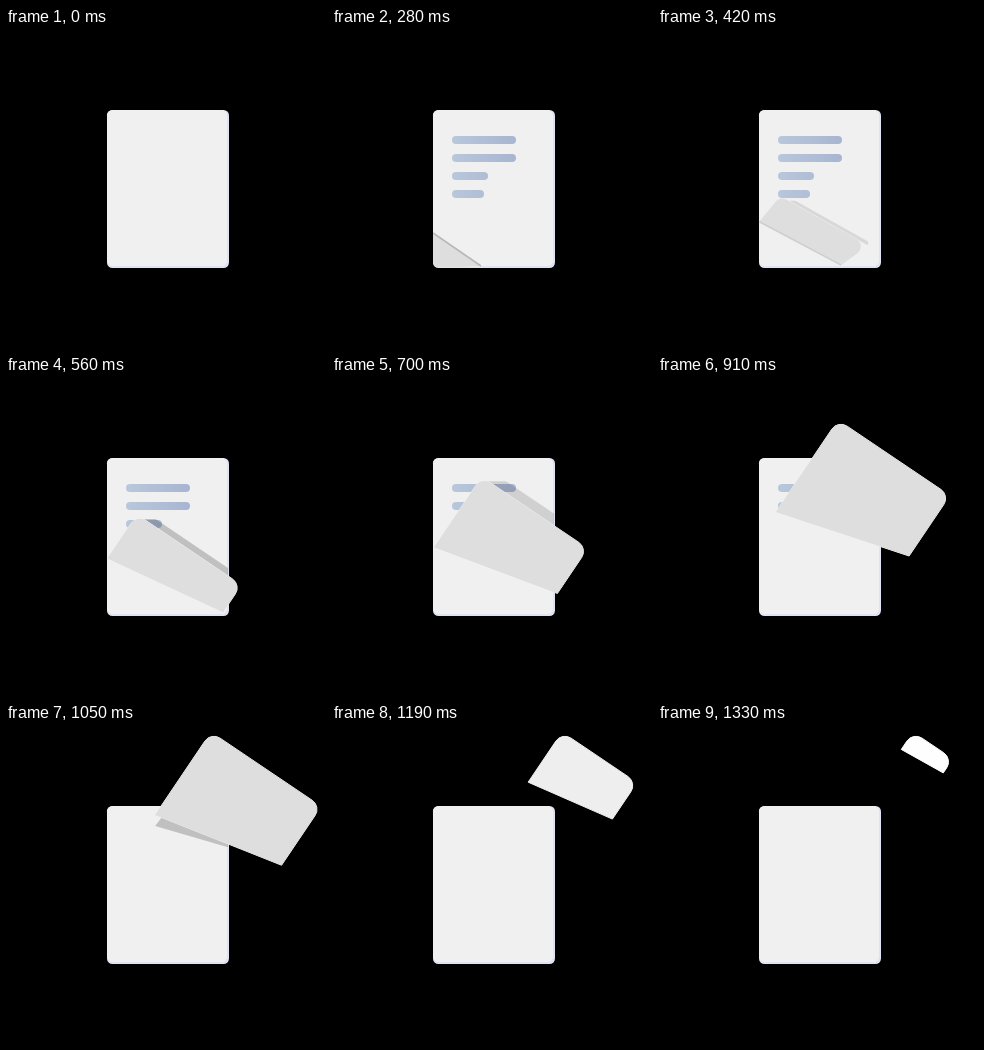
Write an HTML page with a canvas that moves like this. It is 320x320 px and loops after 1.43 s.

```html
<!DOCTYPE html>
<html>
<head>
<meta charset="utf-8">
<style>
html, body { margin: 0; width: 100%; height: 100%; overflow: hidden; background: #000; }
canvas { display: block; }
</style>
</head>
<body>
<canvas id="stage" width="320" height="320"></canvas>
<script>
const ctx = document.getElementById('stage').getContext('2d');
const STEP = 70, LOOP = 1430, LAST = 19;
const PEEL = 4, LIFT = 8, AWAY = 15;
const TILT = 34 * Math.PI / 180;

// The lifted card: top-left corner, length of its top edge and of both sides down to the fold
const CARD = [
  { step: LIFT, x: 131, y: 138.5, top: 126, left: 53, right: 33 },
  { step: 11, x: 159, y: 82, top: 129, left: 101, right: 65 },
  { step: 13, x: 180, y: 44, top: 135, left: 111, right: 73 },
  { step: AWAY, x: 205, y: 8, top: 133, left: 100, right: 71 },
  { step: LAST, x: 255, y: 8, top: 48, left: 21, right: 17 }
];

const clamp = (v, lo = 0, hi = 1) => Math.min(hi, Math.max(lo, v));
const mix = (a, b, t) => a + (b - a) * t;
const mixPoint = (p, q, t) => ({ x: mix(p.x, q.x, t), y: mix(p.y, q.y, t) });
const along = (p, angle, d) => ({ x: p.x + d * Math.cos(angle), y: p.y + d * Math.sin(angle) });

// Corners in order: left fold end, top left, top right, right fold end
function cardAt(step) {
  const i = Math.max(1, CARD.findIndex(k => k.step >= step));
  const from = CARD[i - 1], to = CARD[i];
  const t = (step - from.step) / (to.step - from.step);
  const at = key => mix(from[key], to[key], t);
  const topLeft = { x: at('x'), y: at('y') };
  const topRight = along(topLeft, TILT, at('top'));
  const down = TILT + Math.PI / 2;
  return [along(topLeft, down, at('left')), topLeft, topRight, along(topRight, down, at('right'))];
}

// The page corner swings up while the fold advances evenly
function peelAt(step) {
  const t = (step - PEEL) / (LIFT - PEEL), swing = Math.sin(t * Math.PI / 2);
  const [a, d, c, b] = cardAt(LIFT);
  const foldEnd = { x: 149, y: 238 };
  return [
    mixPoint({ x: 101, y: 205 }, a, t),
    mixPoint({ x: 101, y: 240 }, d, swing),
    mixPoint(foldEnd, c, swing),
    mixPoint(foldEnd, b, t)
  ];
}

function roundRect(x, y, w, h, r, fill) {
  ctx.beginPath();
  ctx.roundRect(x, y, w, h, r);
  ctx.fillStyle = fill;
  ctx.fill();
}

function shade(points, alpha) {
  ctx.beginPath();
  points.forEach(([x, y]) => ctx.lineTo(x, y));
  ctx.fillStyle = `rgba(0,0,0,${alpha})`;
  ctx.fill();
}

function clipTo(buildPath, draw) {
  ctx.save();
  ctx.beginPath();
  buildPath();
  ctx.clip();
  draw();
  ctx.restore();
}

const sheetPath = () => ctx.roundRect(101, 82, 121, 157, 5.5);

function drawLines(step) {
  const tint = ctx.createLinearGradient(120, 0, 184, 0);
  tint.addColorStop(0, '#b9c7db');
  tint.addColorStop(1, '#a8b5d1');
  [64, 64, 36, 32].slice(0, step).forEach((w, i) => roundRect(120, 108 + 18 * i, w, 8, 4, tint));
}

function drawShadows(step, [a, d, c, b]) {
  // band cast above the lifted edge
  const lift = 8 + (step - LIFT) * 2;
  const above = step < LIFT ? 0.05 * (step - PEEL) : 0.2 - 0.033 * (step - LIFT);
  if (above > 0) {
    clipTo(() => ctx.rect(0, d.y + 4.5, 320, 320), () => shade([
      [d.x, d.y], [d.x, d.y - lift], [c.x, c.y - lift], [c.x, c.y]
    ], above));
  }
  // wedge cast below the sheet as it leaves
  const below = 0.2 - 0.1 * Math.abs(step - AWAY);
  if (below > 0) {
    shade([[a.x + 7, a.y + 2], [a.x, a.y + 11], [a.x + 72, a.y + 32], [b.x, b.y]], below);
  }
}

function drawFlap(step, [a, d, c, b]) {
  const r = clamp(6 + (step - PEEL) * 1.25, 6, 11);
  const grey = mix(222, 254, clamp((step - AWAY) / (LAST - AWAY)));
  ctx.beginPath();
  ctx.moveTo(a.x, a.y);
  ctx.arcTo(d.x, d.y, c.x, c.y, r);
  ctx.arcTo(c.x, c.y, b.x, b.y, r);
  ctx.lineTo(b.x, b.y);
  ctx.closePath();
  ctx.lineWidth = 1;
  ctx.strokeStyle = '#f0f0f0';
  ctx.stroke();
  ctx.fillStyle = `rgb(${grey},${grey},${grey})`;
  ctx.fill();

  const crease = clamp((LIFT - step) / (LIFT - PEEL));
  if (crease > 0) {
    ctx.beginPath();
    ctx.moveTo(a.x, a.y);
    ctx.lineTo(b.x, b.y);
    ctx.lineWidth = 1.6;
    ctx.strokeStyle = `rgba(184,184,184,${crease})`;
    ctx.stroke();
  }
}

function draw(step) {
  ctx.clearRect(0, 0, 320, 320);
  roundRect(101, 82, 122, 158, 5.5, '#dfe3f3');
  roundRect(101, 82, 120, 156, 5.5, '#f0f0f0');
  if (step < PEEL - 1) return drawLines(step);

  const pose = step < LIFT ? peelAt(step) : cardAt(step);
  const [a, , , b] = pose;
  const foldY = x => a.y + (b.y - a.y) / (b.x - a.x) * (x - a.x);
  // only the part of the top sheet above the fold still shows its lines
  clipTo(() => {
    ctx.moveTo(0, -400);
    ctx.lineTo(0, foldY(0));
    ctx.lineTo(320, foldY(320));
    ctx.lineTo(320, -400);
  }, () => drawLines(step));
  clipTo(sheetPath, () => drawShadows(step, pose));
  if (step <= PEEL) clipTo(sheetPath, () => drawFlap(step, pose));
  else drawFlap(step, pose);
}

function tick() {
  draw(Math.min(LAST, Math.floor(performance.now() % LOOP / STEP)));
  requestAnimationFrame(tick);
}
tick();
</script>
</body>
</html>
```
